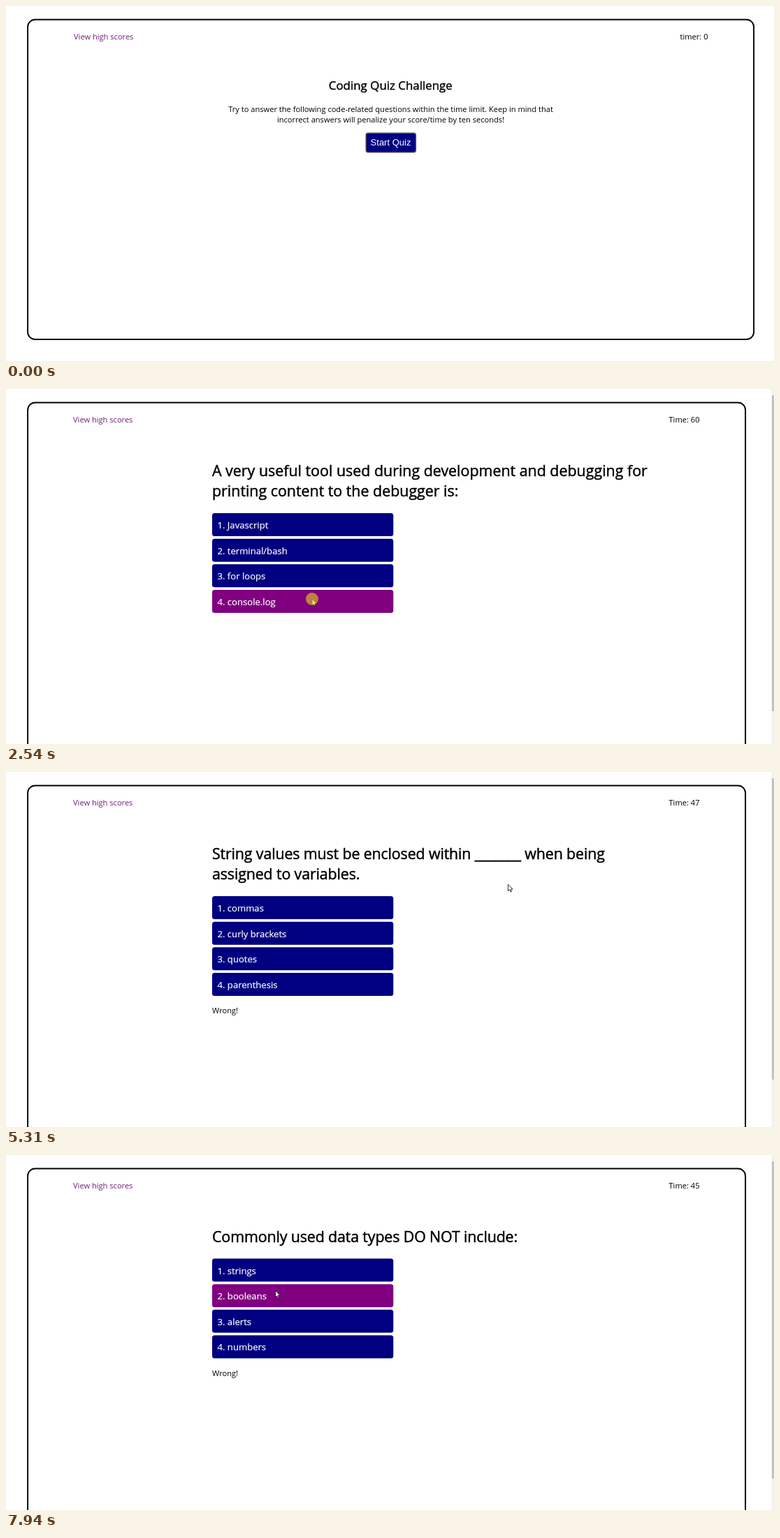
An HTML page for the animation above (8 s loop, 1099 by 509 pixels).

```html
<!DOCTYPE html>
<html lang="en">
<head>
<meta charset="utf-8">
<title>Coding Quiz Challenge</title>
<style>
  html, body { margin: 0; width: 100%; height: 100%; overflow: hidden; background: #fff; }
  svg { display: block; width: 1099px; height: 509px; font: 11.1px "Open Sans", "Noto Sans", sans-serif; }
  .title { font-size: 16.9px; stroke: #000; stroke-width: .4px; }
  .question { font-size: 21.4px; stroke: #000; stroke-width: .45px; }
  .blank { letter-spacing: -.14px; }
  .choice { font-size: 13.1px; fill: #fff; stroke: #fff; stroke-width: .2px; }
  .start { font: 13px "Liberation Sans", Arial, sans-serif; fill: #fff; }
  .link { fill: #702078; }
</style>
</head>
<body>
<svg id="stage" viewBox="0 0 1099 509"></svg>
<script>
const LOOP = 8000, STEP = 67.5, PRESS = 130;
const TIMER_START = 2200, SECOND = 1010;
const NAVY = '#000080', PURPLE = '#800080';
const stage = document.getElementById('stage');

const questions = [
  { from: 1210, result: '',
    lines: ['A very useful tool used during development and debugging for', 'printing content to the debugger is:'],
    choices: ['Javascript', 'terminal/bash', 'for loops', 'console.log'] },
  { from: 2670, result: 'Correct!', style: 'blank',
    lines: ['Arrays in Javascript can be used to store _______.'],
    choices: ['numbers and strings', 'other arrays', 'booleans', 'all of the above'] },
  { from: 4500, result: 'Wrong!', style: 'blank',
    lines: ['String values must be enclosed within _______ when being', 'assigned to variables.'],
    choices: ['commas', 'curly brackets', 'quotes', 'parenthesis'] },
  { from: 7610, result: 'Wrong!', style: 'blank',
    lines: ['Commonly used data types DO NOT include:'],
    choices: ['strings', 'booleans', 'alerts', 'numbers'] }
];
const wrongAt = questions.find(q => q.result === 'Wrong!').from;

// Each move curves from where the last one ended, pulled towards `via`.
const point = (x, y) => ({ x, y });
const mix = (a, b, u) => point(a.x + (b.x - a.x) * u, a.y + (b.y - a.y) * u);
const moves = [];
let rest = point(860, 446);
function move(at, steps, to, via = mix(rest, to, .5)) {
  moves.push({ at, steps, from: rest, via, to });
  rest = to;
}
move(120, 9, point(551, 198));
move(1400, 10, point(438, 301), point(509, 221));
move(2930, 7, point(301, 310), point(370, 340));
move(3790, 7, point(354, 239), point(361, 244));
move(5030, 12, point(983, 57), point(879, 144));
move(5850, 3, point(983, 45));
move(6520, 12, point(386, 205), point(440, 307));
move(7350, 1, point(385.5, 200));
move(7940, 1, point(385.5, 194.5));

const along = (m, u) => mix(mix(m.from, m.via, u), mix(m.via, m.to, u), u);

// The hover state trails the moving pointer by one step.
function pointerAt(t) {
  const m = moves.filter(item => item.at <= t).pop();
  if (!m) return null;
  const step = Math.min(m.steps, Math.floor((t - m.at) / STEP + .2) + 1);
  const tip = along(m, step / m.steps);
  return { tip, hot: step < m.steps ? along(m, (step - 1) / m.steps) : tip };
}

// A wrong answer costs ten seconds, shown at the next tick.
function timerAt(t) {
  if (t < TIMER_START) return 'timer: 0';
  const elapsed = Math.floor((t - TIMER_START) / SECOND);
  const penalty = TIMER_START + elapsed * SECOND > wrongAt ? 10 : 0;
  return 'Time: ' + (60 - elapsed - penalty);
}

const inside = (p, x, y, w, h) => p && p.x >= x && p.x <= x + w && p.y >= y && p.y <= y + h;
const text = (x, y, str, attrs = '') => `<text x="${x}" y="${y}" ${attrs}>${str}</text>`;
const rect = (x, y, w, h, attrs) => `<rect x="${x}" y="${y}" width="${w}" height="${h}" ${attrs}/>`;

function card(width, height, linkX, timer) {
  return rect(31.1, 19.5, width, height, 'rx="10.5" fill="none" stroke="#000" stroke-width="1.9"') +
    text(linkX, 48, 'View high scores', 'class="link"') +
    text(width - 34.5, 48, timer, 'text-anchor="end"');
}

function intro(hot) {
  const mid = 'text-anchor="middle"';
  const fill = inside(hot, 515, 182, 72, 28) ? PURPLE : NAVY;
  return card(1039, 458.5, 97, 'timer: 0') +
    text(550.3, 120, 'Coding Quiz Challenge', `class="title" ${mid}`) +
    text(550.5, 151.5, 'Try to answer the following code-related questions within the time limit. Keep in mind that', mid) +
    text(550.5, 167, 'incorrect answers will penalize your score/time by ten seconds!', mid) +
    rect(515.2, 182.2, 71.2, 27.6, `rx="3" fill="${fill}" stroke="#505050" stroke-width="1.4"`) +
    text(550.5, 200, 'Start Quiz', `class="start" ${mid}`);
}

function quiz(q, t, hot) {
  const top = 119 + 29.5 * q.lines.length;
  const thumb = 499 - 23 * q.lines.length - (q.result ? 21 : 0);
  let out = card(1027, 600, 96, timerAt(t));
  q.lines.forEach((line, i) => {
    out += text(295, 125 + 29.4 * i, line, `class="question ${q.style || ''}"`);
  });
  q.choices.forEach((choice, i) => {
    const y = top + 36.65 * i;
    const fill = inside(hot, 295, y, 259, 33) ? PURPLE : NAVY;
    out += rect(295, y, 259.3, 33, `rx="3.5" fill="${fill}"`) +
      text(302.5, y + 22, `${i + 1}. ${choice}`, 'class="choice"');
  });
  return out + text(295, top + 168, q.result) +
    rect(1095.5, 0, 3.5, 509, 'fill="#f1f1f1"') +
    rect(1096, 9, 3, thumb, 'fill="#c1c1c1"');
}

function pointer({ x, y }, pressed) {
  return `<g transform="translate(${x} ${y})">` +
    '<path d="M0 0V9.4L2.2 7.4 3.8 10.9 5.2 10.3 3.7 6.9H6.7Z" fill="#fff" stroke="#000" stroke-width=".8"/>' +
    (pressed ? '<circle r="9" fill="#ebd515" fill-opacity=".6"/>' : '') + '</g>';
}

function scene(t) {
  const p = pointerAt(t);
  const q = questions.filter(item => item.from <= t).pop();
  const hot = p && p.hot;
  const pressed = questions.some(({ from }) => t >= from - PRESS && t < from);
  return (q ? quiz(q, t, hot) : intro(hot)) + (p ? pointer(p.tip, pressed) : '');
}

let shown = '';
const origin = performance.now();
function frame() {
  const markup = scene((performance.now() - origin) % LOOP);
  if (markup !== shown) stage.innerHTML = shown = markup;
  requestAnimationFrame(frame);
}
frame();
</script>
</body>
</html>
```
